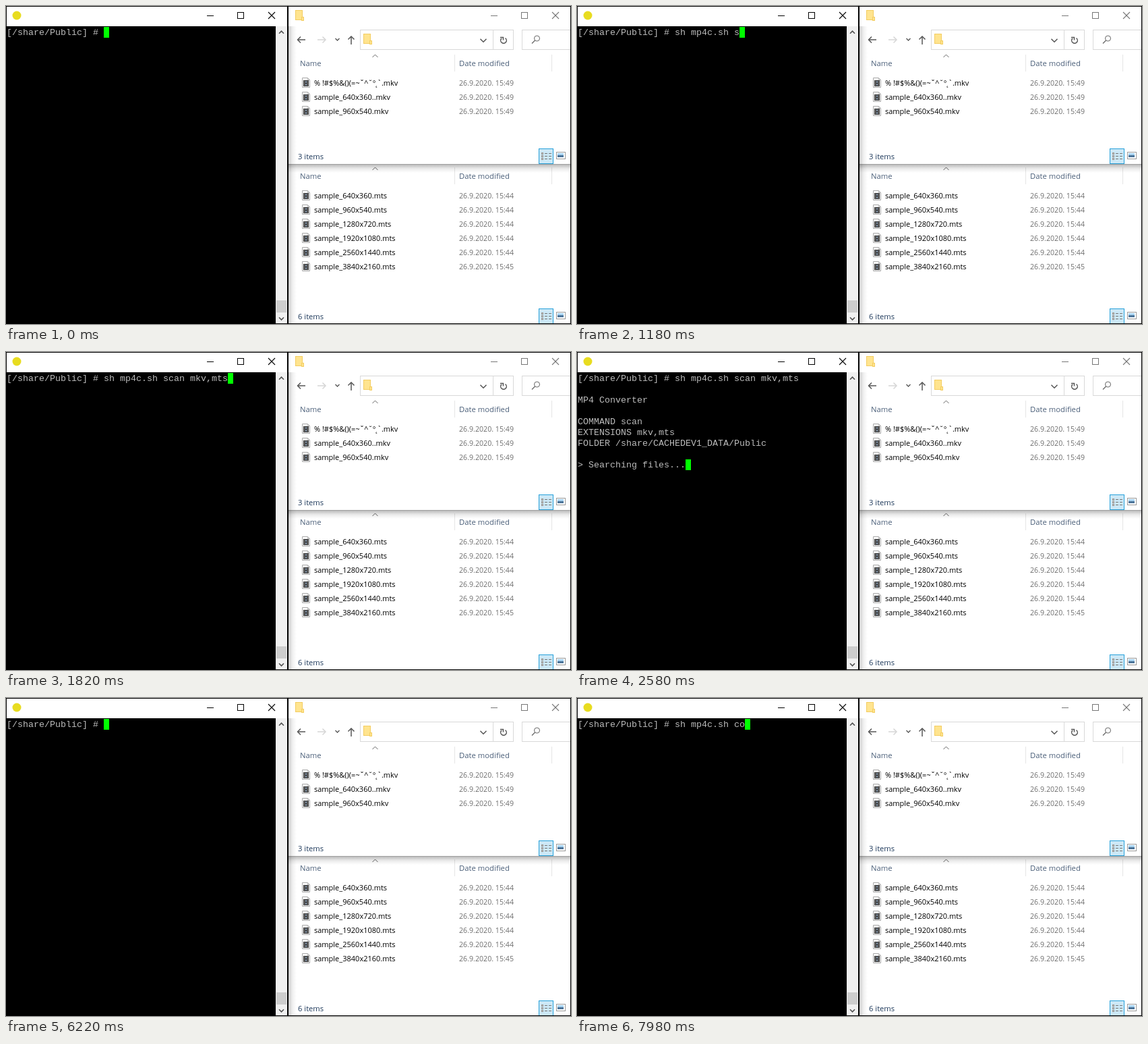
Animation, 838 px wide and 471 px high, one loop 8000 ms. Source, as an HTML page with a canvas:

```html
<!DOCTYPE html>
<html lang="en">
<head>
<meta charset="utf-8">
<title>Terminal scan</title>
<style>
html, body { margin: 0; width: 100%; height: 100%; overflow: hidden; background: #fff; }
canvas { display: block; width: 838px; height: 471px; }
</style>
</head>
<body>
<canvas id="stage" width="838" height="471"></canvas>
<script>
const ctx = document.getElementById('stage').getContext('2d');
const LOOP = 8000;
const MONO = '13.333px "Liberation Mono", "Courier New", monospace';
const ui = size => size + 'px "Open Sans", "Noto Sans", sans-serif';

const PROMPT = '[/share/Public] # ';
const SCAN = 'sh mp4c.sh scan mkv,mts';
const CONVERT = 'sh mp4c.sh convert';
const MKV = ['% !#$%&()(=~ˇ^˘°˛`.mkv', 'sample_640x360..mkv', 'sample_960x540.mkv'];
const MTS = ['640x360', '960x540', '1280x720', '1920x1080', '2560x1440', '3840x2160']
  .map(size => `sample_${size}.mts`);
const FOUND = [...MKV.map(f => '/videos-mkv/' + f), ...MTS.map(f => '/videos-mts/' + f)]
  .map((path, i) => `  [${i + 1}] ${path}`);

// Keystroke times; at the positions in "pairs" two characters land at once.
const SCAN_KEYS = [500, 580, 640, 700, 780, 820, 900, 960, 1040, 1100, 1160, 1240, 1300,
  1380, 1440, 1500, 1580, 1640, 1700, 1760, 1820];
const CONVERT_KEYS = Array.from({ length: 12 }, (_, i) => 7220 + Math.round(i * 38 / 11) * 20);

function typed(text, t, keys, pairs) {
  const n = keys.filter(k => k <= t).length;
  return PROMPT + text.slice(0, n + pairs.filter(p => n >= p).length);
}

function terminalLines(t) {
  if (t >= 6220) return [typed(CONVERT, t, CONVERT_KEYS, [2])];
  const lines = [typed(SCAN, t, SCAN_KEYS, [2, 15])];
  if (t < 2420) return lines;
  if (t < 2580) return [...lines, ''];
  lines.push('', 'MP4 Converter', '', 'COMMAND scan', 'EXTENSIONS mkv,mts',
    'FOLDER /share/CACHEDEV1_DATA/Public', '', '> Searching files...');
  if (t < 3100) return lines;
  lines.push('> Found 9 file(s)');
  if (t >= 3160) lines.push(...FOUND);
  if (t >= 3220) return [...lines, '> Done', '', 'TIME 00:00:01 (hh:mm:ss)', '', PROMPT];
  return [...lines, ''];
}

function rect(x, y, w, h, color) {
  ctx.fillStyle = color;
  ctx.fillRect(x, y, w, h);
}

function frame(x, y, w, h, color) {
  ctx.strokeStyle = color;
  ctx.lineWidth = 1;
  ctx.strokeRect(x + .5, y + .5, w - 1, h - 1);
}

function line(color, width, ...points) {
  ctx.strokeStyle = color;
  ctx.lineWidth = width;
  ctx.beginPath();
  for (let i = 0; i < points.length; i += 2) ctx.lineTo(points[i], points[i + 1]);
  ctx.stroke();
}

function arc(x, y, r, from, to, color, width) {
  ctx.strokeStyle = color;
  ctx.lineWidth = width;
  ctx.beginPath();
  ctx.arc(x, y, r, from, to);
  ctx.stroke();
}

function text(str, x, y, font, color) {
  ctx.font = font;
  ctx.fillStyle = color;
  ctx.fillText(str, x, y);
}

// Fades from the top or left edge of the box towards (dx, dy).
function shadow(x, y, w, h, dx, dy, alpha) {
  const fade = ctx.createLinearGradient(x, y, x + dx, y + dy);
  fade.addColorStop(0, `rgba(0,0,0,${alpha})`);
  fade.addColorStop(.5, `rgba(0,0,0,${alpha * .3})`);
  fade.addColorStop(1, 'rgba(0,0,0,0)');
  rect(x, y, w, h, fade);
}

// dir 1 points down, -1 points up
function chevron(x, y, half, dir, color, width) {
  const h = half * dir / 2;
  line(color, width, x - half, y - h, x, y + h, x + half, y - h);
}

function windowButtons(x, color) {
  rect(x, 14, 10, 1, color);
  frame(x + 45, 9, 10, 10, color);
  line(color, 1.1, x + 91, 9, x + 101, 19);
  line(color, 1.1, x + 101, 9, x + 91, 19);
}

function folder(x, y) {
  rect(x, y, 11, 15, '#f3cd62');
  rect(x + 1, y + 1, 9, 13, '#ffe48f');
  rect(x + 9, y + 10, 4, 6, '#f3cd62');
  rect(x + 10, y + 11, 2, 4, '#ffe48f');
}

function videoIcon(x, y) {
  ctx.fillStyle = '#fff';
  ctx.beginPath();
  ctx.moveTo(x + .5, y + .5);
  ctx.lineTo(x + 8.5, y + .5);
  ctx.lineTo(x + 11.5, y + 3.5);
  ctx.lineTo(x + 11.5, y + 14.5);
  ctx.lineTo(x + .5, y + 14.5);
  ctx.closePath();
  ctx.fill();
  ctx.strokeStyle = '#a8a8a8';
  ctx.lineWidth = 1;
  ctx.stroke();
  line('#b8b8b8', 1, x + 8.5, y + 1, x + 8.5, y + 3.5, x + 11, y + 3.5);
  rect(x + 2, y + 4, 8, 9, '#2b2b2b');
  for (let i = 0; i < 4; i++) {
    rect(x + 3, y + 5 + i * 2, 1, 1, '#ddd');
    rect(x + 8, y + 5 + i * 2, 1, 1, '#ddd');
  }
  rect(x + 5, y + 5, 2, 3, '#8797a8');
  rect(x + 5, y + 9, 2, 3, '#8797a8');
}

function fileList(top, files, dates) {
  chevron(547.5, top + 2, 4, -1, '#666', 1);
  for (const x of [665, 809]) rect(x, top, 1, 25, '#e5e5e5');
  text('Name', 436, top + 17, ui(11.3), '#4c607a');
  text('Date modified', 672, top + 17, ui(11.3), '#4c607a');
  files.forEach((name, i) => {
    const y = top + 46 + i * 21;
    videoIcon(439, y - 12);
    text(name, 457, y, ui(11), '#000');
    text(dates[i], 672, y, ui(10.65), '#6d6d6d');
  });
}

function statusBar(top, label) {
  text(label, 433, top + 16, ui(11.2), '#1e395b');
  rect(790, top, 22, 23, '#cce8f6');
  frame(790, top, 22, 23, '#26a0da');
  for (let i = 0; i < 3; i++) {
    const y = top + 6 + i * 4;
    frame(794, y, 3, 3, '#9a9088');
    rect(799, y + 1, 4, 1, '#777');
    rect(805, y + 1, 4, 1, '#777');
  }
  rect(816, top + 5, 14, 11, '#fff');
  frame(816, top + 5, 14, 11, '#999');
  rect(818, top + 7, 9, 4, '#a9d4f2');
  rect(818, top + 10, 9, 3, '#4b7398');
}

function toolbar() {
  line('#555', 1.5, 444, 50, 433, 50);
  line('#555', 1.5, 437, 45.5, 432.5, 50, 437, 54.5);
  line('#d6d6d6', 1.5, 462, 50, 474, 50);
  line('#d6d6d6', 1.5, 469.5, 45.5, 474, 50, 469.5, 54.5);
  chevron(491.5, 49.5, 3, 1, '#555', 1.3);
  line('#555', 1.5, 512, 57, 512, 45);
  line('#555', 1.5, 507.5, 49.5, 512, 45, 516.5, 49.5);
  frame(525, 35, 228, 30, '#d9d9d9');
  rect(722, 36, 1, 28, '#d9d9d9');
  folder(530, 41);
  chevron(708, 51, 4.5, 1, '#555', 1.5);
  arc(738, 51, 4.3, -Math.PI * .3, Math.PI * 1.25, '#555', 1.5);
  line('#555', 1.5, 733, 46.5, 737.5, 46.5, 737.5, 50.5);
  frame(765, 35, 80, 30, '#d9d9d9');
  arc(787.5, 48, 4, 0, Math.PI * 2, '#666', 1);
  line('#666', 1.2, 784.5, 51, 780, 55.5);
}

function explorer() {
  folder(429, 6);
  windowButtons(719, '#777');
  toolbar();
  fileList(72, MKV, Array(3).fill('26.9.2020. 15:49'));
  statusBar(211, '3 items');
  rect(419, 234, 418, 1, '#a0a0a0');
  fileList(239, MTS, MTS.map((_, i) => '26.9.2020. 15:4' + (i < 5 ? 4 : 5)));
  statusBar(448, '6 items');
  shadow(419, 235, 418, 12, 0, 12, .26);
  shadow(419, 30, 12, 440, 12, 0, .2);
}

function terminal(t) {
  ctx.fillStyle = '#e8dc20';
  ctx.beginPath();
  ctx.arc(16, 14, 6.5, 0, Math.PI * 2);
  ctx.fill();
  windowButtons(298, '#000');
  rect(0, 30, 400, 441, '#000');
  rect(400, 30, 17, 440, '#f0f0f0');
  rect(401, 436, 15, 18, '#cdcdcd');
  chevron(408.5, 39, 3.5, -1, '#505050', 1.6);
  chevron(408.5, 463, 3.5, 1, '#505050', 1.6);
  const lines = terminalLines(t);
  lines.forEach((str, row) => text(str, 1, 43 + row * 16, MONO, '#bbb'));
  const last = lines.length - 1;
  rect(1 + lines[last].length * 8, 31 + last * 16, 8, 16, '#0f0');
}

function draw() {
  rect(0, 0, 838, 471, '#fff');
  explorer();
  terminal(performance.now() % LOOP);
  frame(0, 0, 838, 471, '#000');
  rect(417, 0, 2, 471, '#000');
  requestAnimationFrame(draw);
}
draw();
</script>
</body>
</html>
```
